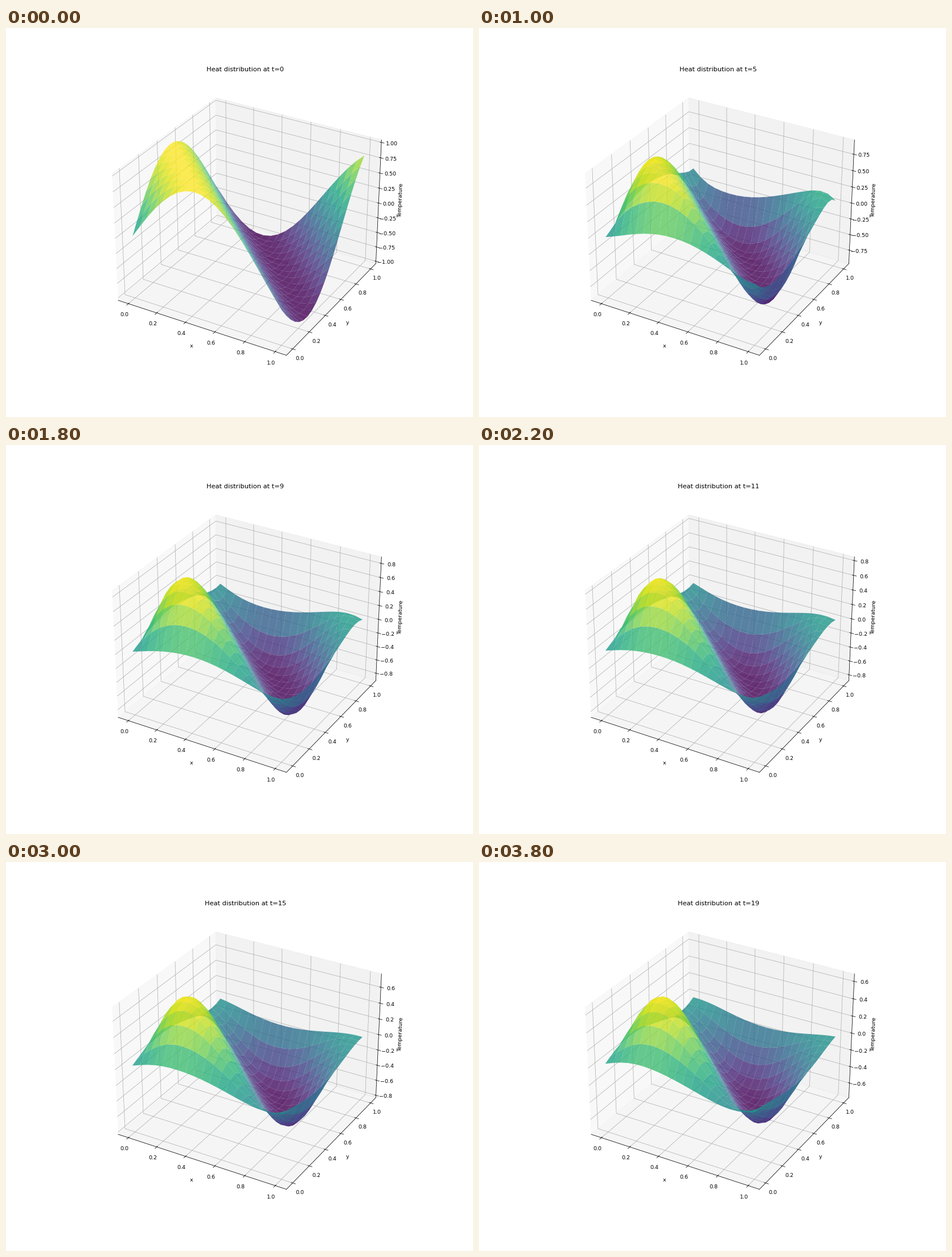
Recreate the animation shown at these times as a matplotlib script. Size 820 px wide and 683 px high, loop 4 s.

```python
import numpy as np
import matplotlib.pyplot as plt
from matplotlib.animation import FuncAnimation

DPI = 68.3
WIDTH, HEIGHT = 820, 683
STEPS = 20
INTERVAL = 200
N = 20          # grid points per side
K = 3.623       # wave number of the starting field
R = 0.2         # diffusivity * dt / h^2

axis = np.linspace(0, 1, N)
X, Y = np.meshgrid(axis, axis)


def diffuse(u):
    """One explicit heat step with periodic edges."""
    around = sum(np.roll(u, s, axis=a) for s in (1, -1) for a in (0, 1))
    return u + R * (around - 4 * u)


fields = [np.sin(K * (X + Y))]
for _ in range(STEPS - 1):
    fields.append(diffuse(fields[-1]))

plt.rcParams["font.family"] = "DejaVu Sans"
# The small excess keeps the pixel size from being truncated.
fig = plt.figure(figsize=((WIDTH + 0.01) / DPI, (HEIGHT + 0.01) / DPI), dpi=DPI)
ax = fig.add_subplot(111, projection="3d")


def draw(t):
    ax.clear()
    ax.plot_surface(X, Y, fields[t], cmap="viridis", alpha=0.8)
    ax.set_title(f"Heat distribution at t={t}")
    ax.set_xlabel("x")
    ax.set_ylabel("y")
    ax.set_zlabel("Temperature")
    return []


anim = FuncAnimation(fig, draw, frames=STEPS, init_func=lambda: draw(0),
                     interval=INTERVAL, repeat=True, repeat_delay=0, blit=False)
plt.show()
```
